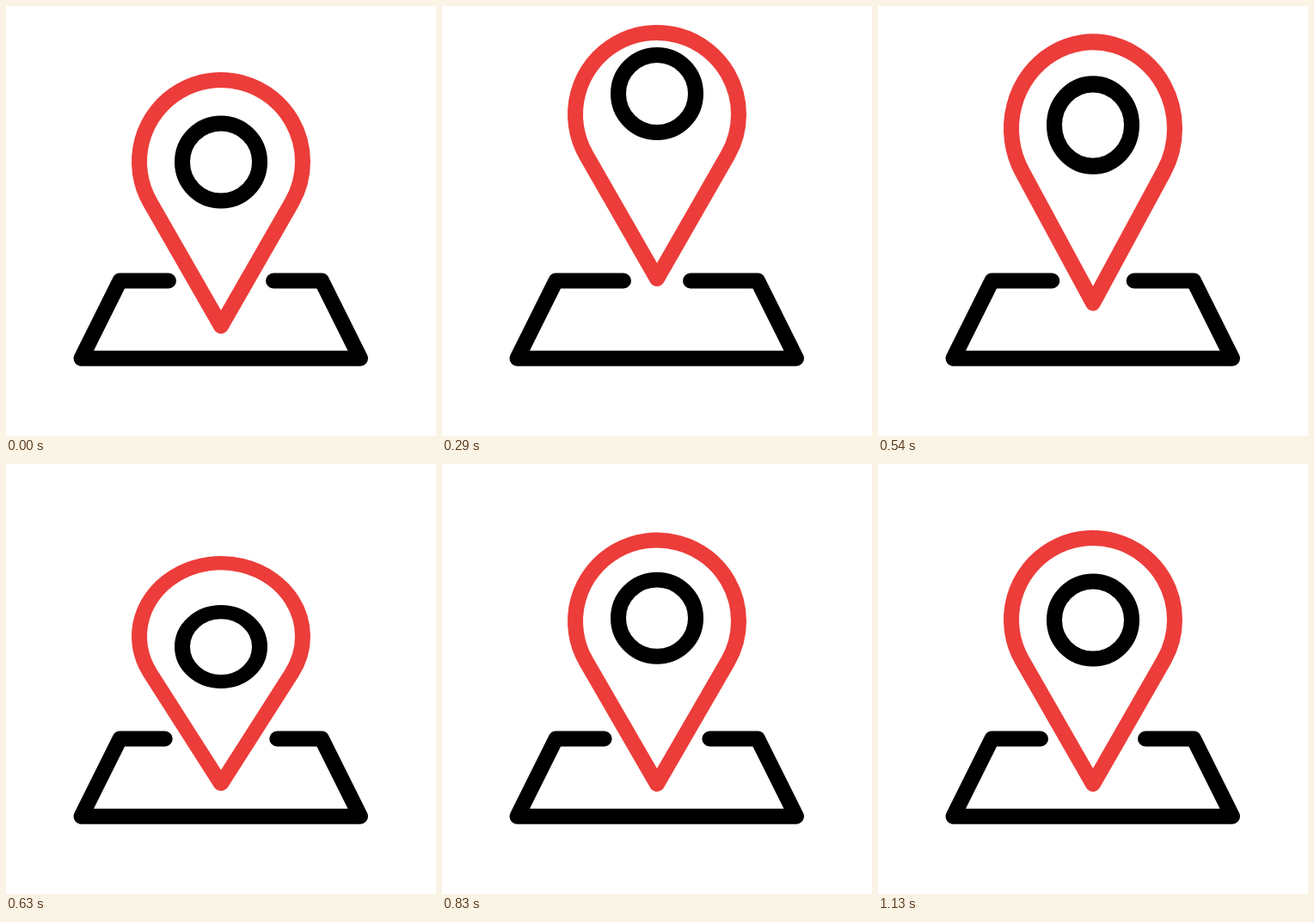
Animation of 500 by 500 pixels, one loop 1.18 s. Source, as an HTML page with a canvas:

```html
<!DOCTYPE html>
<html lang="en">
<head>
<meta charset="utf-8">
<title>Map pin</title>
<style>
  html, body { margin: 0; width: 100%; height: 100%; overflow: hidden; background: #fff; }
  canvas { display: block; width: 100vw; height: 100vh; }
</style>
</head>
<body>
<canvas id="stage" width="500" height="500"></canvas>
<script>
const ctx = document.getElementById('stage').getContext('2d');
const LOOP = 1180, STEP = 1000 / 24, LAST = 27;
const RED = '#ec3d3a', BLACK = '#000', WIDTH = 18;
const CX = 250, TIP = 372, HEAD = 191, RADIUS = 95;
const APEX = 7.8, LAND = 15, HEIGHT = 56.5;

// Half a sine wave between two steps, zero elsewhere.
const bump = (n, from, to) =>
  n > from && n < to ? Math.sin(Math.PI * (n - from) / (to - from)) : 0;

// Eased jump, then free fall.
function lift(n) {
  if (n >= LAND) return 0;
  if (n < APEX) return HEIGHT * Math.sin(Math.PI / 2 * n / APEX) ** 2;
  return HEIGHT * (1 - ((n - APEX) / (LAND - APEX)) ** 2);
}

// Squash at take-off, stretch in the fall, squash on landing.
function stretch(n) {
  const impact = n < LAND ? 0 : Math.exp(-(((n - LAND) / 3.2) ** 2));
  return 1 - .08 * bump(n, 0, 5) + .062 * bump(n, 10.2, LAND) - .102 * impact;
}

// The ring trails the pin, then swings to rest.
function ringLag(n) {
  const t = Math.max(0, n - 13.5);
  const swing = Math.exp(-.2386 * t) * Math.sin(3 * Math.PI * t / (LAST - 13.5));
  return 15 * bump(n, 0, 4.8) - 28 * bump(n, 3.7, 13.5) + 19.2 * swing;
}

function stroke(color, path) {
  ctx.strokeStyle = color;
  ctx.beginPath();
  path();
  ctx.stroke();
}

function squashed(y, sy, draw) {
  ctx.save();
  ctx.translate(CX, y);
  ctx.scale(1, sy);
  draw();
  ctx.restore();
}

function drawMap(gap) {
  const end = gap + WIDTH / 2, top = 319.5, bottom = 409.7;
  stroke(BLACK, () => {
    ctx.moveTo(CX - end, top);
    ctx.lineTo(132.5, top);
    ctx.lineTo(87.5, bottom);
    ctx.lineTo(412, bottom);
    ctx.lineTo(367, top);
    ctx.lineTo(CX + end, top);
  });
}

function drawPin() {
  const a = Math.asin(RADIUS / HEAD);
  stroke(RED, () => {
    ctx.moveTo(0, 0);
    ctx.arc(0, -HEAD, RADIUS, Math.PI - a, a);
    ctx.closePath();
  });
}

function drawRing() {
  stroke(BLACK, () => ctx.arc(0, 0, 45, 0, Math.PI * 2));
}

function render(ms) {
  const tick = Math.floor(ms / 10) * 10;
  const n = Math.min(LAST, Math.floor((tick + 4.9) / STEP));
  const up = lift(n), sy = stretch(n), tip = TIP - up;

  ctx.fillStyle = '#fff';
  ctx.fillRect(0, 0, 500, 500);
  ctx.lineWidth = WIDTH;
  ctx.lineCap = ctx.lineJoin = 'round';

  drawMap(52 - .4 * up + 42 * (1 - sy));
  squashed(tip, sy, drawPin);
  squashed(tip - 190.5 * sy + ringLag(n), sy, drawRing);
}

const start = performance.now();
function loop() {
  render((performance.now() - start) % LOOP);
  requestAnimationFrame(loop);
}
loop();
</script>
</body>
</html>
```
